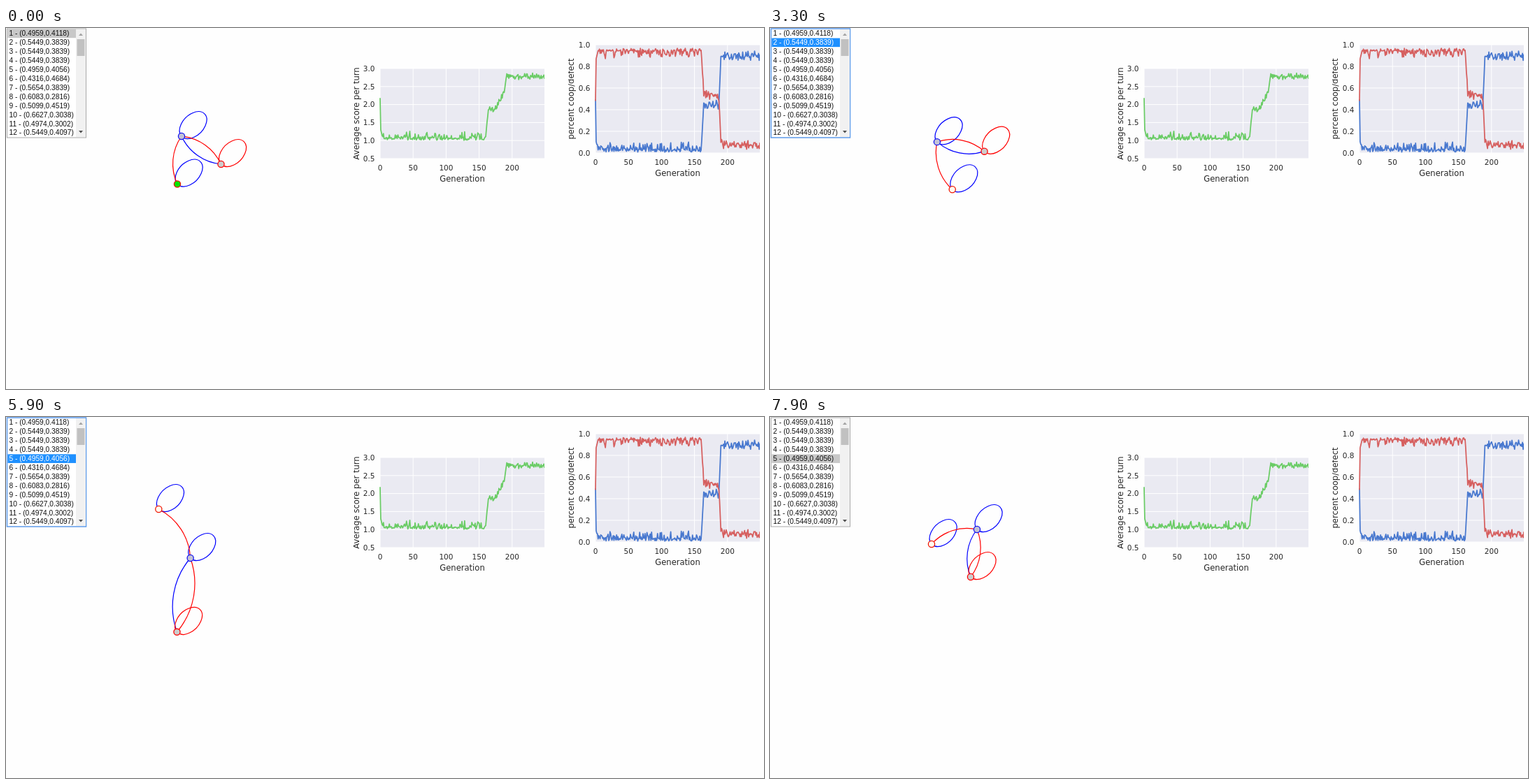
Recreate the animation shown at these times as an HTML page. Size 1084 by 517 pixels, loop 8000 ms.

```html
<!DOCTYPE html>
<html lang="en">
<head>
<meta charset="utf-8">
<title>Strategy graph</title>
<style>
html, body { margin: 0; width: 100%; height: 100%; overflow: hidden; background: #fefefe; }
svg { display: block; }
.chart text { font: 10.5px "DejaVu Sans", sans-serif; fill: #262626; }
.chart .label { font-size: 11.55px; text-anchor: middle; }
.list text { font: 10.2px "Liberation Sans", Arial, sans-serif; fill: #111; }
.series, .edge { fill: none; }
.series { stroke-width: 1.75; stroke-linejoin: round; }
.edge { stroke-width: 1.2; }
</style>
</head>
<body>
<svg id="stage" width="1084" height="517" viewBox="0 0 1084 517"></svg>
<script>
const stage = document.getElementById('stage');

function add(parent, tag, attrs, text) {
  const node = document.createElementNS('http://www.w3.org/2000/svg', tag);
  for (const key in attrs) node.setAttribute(key, attrs[key]);
  if (text !== undefined) node.textContent = text;
  parent.appendChild(node);
  return node;
}

function seeded(seed) {
  return () => {
    seed = (seed * 16807) % 2147483647;
    return seed / 2147483647;
  };
}

// Piecewise linear value through [x, y] points
function along(points, x) {
  let i = 1;
  while (i < points.length - 1 && points[i][0] < x) i++;
  const [x0, y0] = points[i - 1], [x1, y1] = points[i];
  return y0 + (y1 - y0) * Math.min(1, Math.max(0, (x - x0) / (x1 - x0)));
}

// ---- Charts ----
const GEN = 0.944, WIDTH = 235;

function chart({ x, top, bottom, min, max, step, label, labelX, clipX }) {
  const g = add(stage, 'g', { class: 'chart' });
  const toY = v => bottom - (v - min) / (max - min) * (bottom - top);
  const id = 'clip' + x;
  const clip = add(g, 'clipPath', { id });
  add(clip, 'rect', { x: clipX, y: 0, width: x + WIDTH - clipX, height: 240 });
  add(g, 'rect', { x, y: top, width: WIDTH, height: bottom - top, fill: '#eaeaf2' });

  const grid = d => add(g, 'path', { d, stroke: '#fff', 'stroke-width': 1 });
  for (let n = 0; n <= 200; n += 50) {
    const gx = x + n * GEN;
    grid(`M${gx} ${top}V${bottom}`);
    add(g, 'text', { x: gx, y: bottom + 17, 'text-anchor': 'middle' }, n);
  }
  for (let v = min; v < max + 0.01; v += step) {
    grid(`M${x} ${toY(v)}h${WIDTH}`);
    add(g, 'text', { x: x - 7.5, y: toY(v) + 3.7, 'text-anchor': 'end' }, v.toFixed(1));
  }
  add(g, 'text', { class: 'label', x: x + WIDTH / 2, y: bottom + 33 }, 'Generation');
  const side = add(g, 'g', {});
  side.setAttribute('clip-path', `url(#${id})`);
  const title = add(side, 'text', { class: 'label' }, label);
  title.setAttribute('transform', `translate(${labelX} ${(top + bottom) / 2}) rotate(-90)`);

  return (color, trend, noise) => {
    let d = '';
    for (let n = 0; n < 250; n++) {
      d += `${n ? 'L' : 'M'}${x + n * GEN} ${toY(trend(n) + noise(n))}`;
    }
    add(side, 'path', { class: 'series', d, stroke: color });
  };
}

// Sharp one-sided peaks at first, even noise later
function jitter(seed, flat, late) {
  const rnd = seeded(seed);
  return n => {
    const r = rnd(), s = rnd();
    if (n < 3) return 0;
    return n < 161 ? flat * (r * r * r + 0.3 * s - 0.25) : late * (r + s - 1);
  };
}

const score = chart({
  x: 535, top: 58, bottom: 187, min: 0.5, max: 3, step: 0.5,
  label: 'Average score per turn', labelX: 505, clipX: 497
});
const scoreTrend = [[0, 2.18], [1, 1.3], [4, 1.07], [160, 1.05], [164, 1.86], [174, 1.87],
  [188, 2.3], [191, 2.78]];
score('#6acc65', n => along(scoreTrend, n), jitter(4211, 0.2, 0.1));

const share = chart({
  x: 843, top: 24, bottom: 179, min: 0, max: 1, step: 0.2,
  label: 'percent coop/defect', labelX: 811.5, clipX: 804
});
const defectTrend = [[0, 0.48], [1, 0.87], [4, 0.945], [160, 0.95], [164, 0.55],
  [187, 0.52], [190, 0.1], [196, 0.075]];
const defect = n => along(defectTrend, n);
share('#4878cf', n => 0.975 - defect(n), jitter(907, 0.08, 0.055));
share('#d65f5f', defect, jitter(5531, -0.08, 0.05));

// ---- List box ----
const ROW = 12.93;
const list = add(stage, 'g', { class: 'list' });
const frame = add(list, 'rect', { x: 1.5, y: 1, width: 113, height: 156, fill: '#fff' });
const mark = add(list, 'rect', { x: 2.5, width: 97.5, height: 12.6 });
const common = '0.5449,0.3839', first = '0.4959,0.4';
const rows = [
  first + '118', common, common, common, first + '056', '0.4316,0.4684',
  '0.5654,0.3839', '0.6083,0.2816', '0.5099,0.4519', '0.6627,0.3038',
  '0.4974,0.3002', '0.5449,0.4097'
].map((pair, i) => add(list, 'text', { x: 4.5, y: 11.2 + i * ROW }, `${i + 1} - (${pair})`));
add(list, 'rect', { x: 100, y: 2, width: 14, height: 154, fill: '#f1f1f1' });
add(list, 'rect', { x: 101.5, y: 16, width: 11, height: 24, fill: '#c1c1c1' });
add(list, 'path', { d: 'M104 11h6l-3-3.5z', fill: '#a3a3a3' });
add(list, 'path', { d: 'M104 147h6l-3 3.5z', fill: '#505050' });

const within = (t, from, to) => t >= from && t < to;
const picks = [2800, 4400, 4900, 5500];

function drawList(t) {
  const row = picks.filter(p => p <= t).length;
  const focus = within(t, picks[0], 7200);
  frame.setAttribute('stroke', focus ? '#5e9bea' : '#a9a9a9');
  frame.setAttribute('stroke-width', focus ? 1.5 : 1);
  mark.setAttribute('y', 1.6 + row * ROW);
  mark.setAttribute('fill', focus ? '#1e90ff' : '#c8c8c8');
  rows.forEach((r, i) => { r.style.fill = focus && i === row ? '#fff' : ''; });
}

// ---- State graph ----
// [ms, coop x y, defect x y, start x y]
const poses = [
  [1300, 251, 155, 307.5, 195, 245, 223.5],
  [1500, 252, 170, 310, 190, 197, 190],
  [1700, 325, 188, 292, 200, 262, 118],
  [1800, 378.5, 170.5, 311.5, 185, 300.5, 144],
  [2600, 262, 153, 232.5, 214.5, 323.5, 183],
  [2800, 240, 160, 307, 180, 262, 230],
  [4000, 237.5, 167.5, 306, 172, 259, 233],
  [4400, 280, 200, 306, 185, 260, 260],
  [4900, 300, 230, 197, 346, 240, 290],
  [5200, 306, 170, 242, 215, 251.5, 208],
  [5800, 262, 205, 237, 319, 215, 140],
  [6400, 272, 187, 282, 252, 235, 92],
  [6600, 271.5, 187.5, 283, 252, 259.5, 125],
  [7600, 318, 134, 290, 222, 232, 165],
  [7900, 296, 161, 287, 229, 231, 182]
];
const COOP = 0, DEFECT = 1, START = 2;
const graph = add(stage, 'g');
const edges = [
  [COOP, COOP, 'blue'], [COOP, DEFECT, 'red'], [DEFECT, COOP, 'blue'],
  [DEFECT, DEFECT, 'red'], [START, START, 'blue'], [START, COOP, 'red']
].map(([from, to, stroke]) => ({ from, to, path: add(graph, 'path', { class: 'edge', stroke }) }));
const nodes = [['#c2c2d6', '#1414f0'], ['#ccc', 'red'], ['#fffdf0', '#f01400']].map(
  ([fill, stroke]) => add(graph, 'circle', { r: 4.6, fill, stroke, 'stroke-width': 1.3 }));
const pointer = add(graph, 'path', { d: 'M-2.5 0L1.5-3V3z', fill: '#5a5a00' });

function arc({ from, to }, at) {
  const [x, y] = at[from];
  if (from === to) return `M${x} ${y}A23 15 -45 1 1 ${x + 0.75} ${y + 0.75}`;
  const [x2, y2] = at[to], r = Math.hypot(x2 - x, y2 - y);
  return `M${x} ${y}A${r} ${r} 0 0 1 ${x2} ${y2}`;
}

function drawGraph(t) {
  const value = k => along(poses.map(p => [p[0], p[k]]), t);
  const at = nodes.map((_, i) => [value(1 + 2 * i), value(2 + 2 * i)]);
  edges.forEach(e => e.path.setAttribute('d', arc(e, at)));
  nodes.forEach((n, i) => {
    n.setAttribute('cx', at[i][0]);
    n.setAttribute('cy', at[i][1]);
  });
  const held = t < 1700 || within(t, 6100, 6500);
  nodes[START].setAttribute('fill', held ? '#00e600' : '#fffdf0');
  const hover = within(t, 4000, 4200) || within(t, 6500, 6800);
  pointer.setAttribute('visibility', hover ? 'visible' : 'hidden');
  pointer.setAttribute('transform', `translate(${at[START]})`);
}

const LOOP = 8000, TICK = 100;
const began = performance.now();

function draw() {
  const t = Math.floor(((performance.now() - began) % LOOP) / TICK) * TICK;
  drawList(t);
  drawGraph(t);
  requestAnimationFrame(draw);
}
draw();
</script>
</body>
</html>
```
